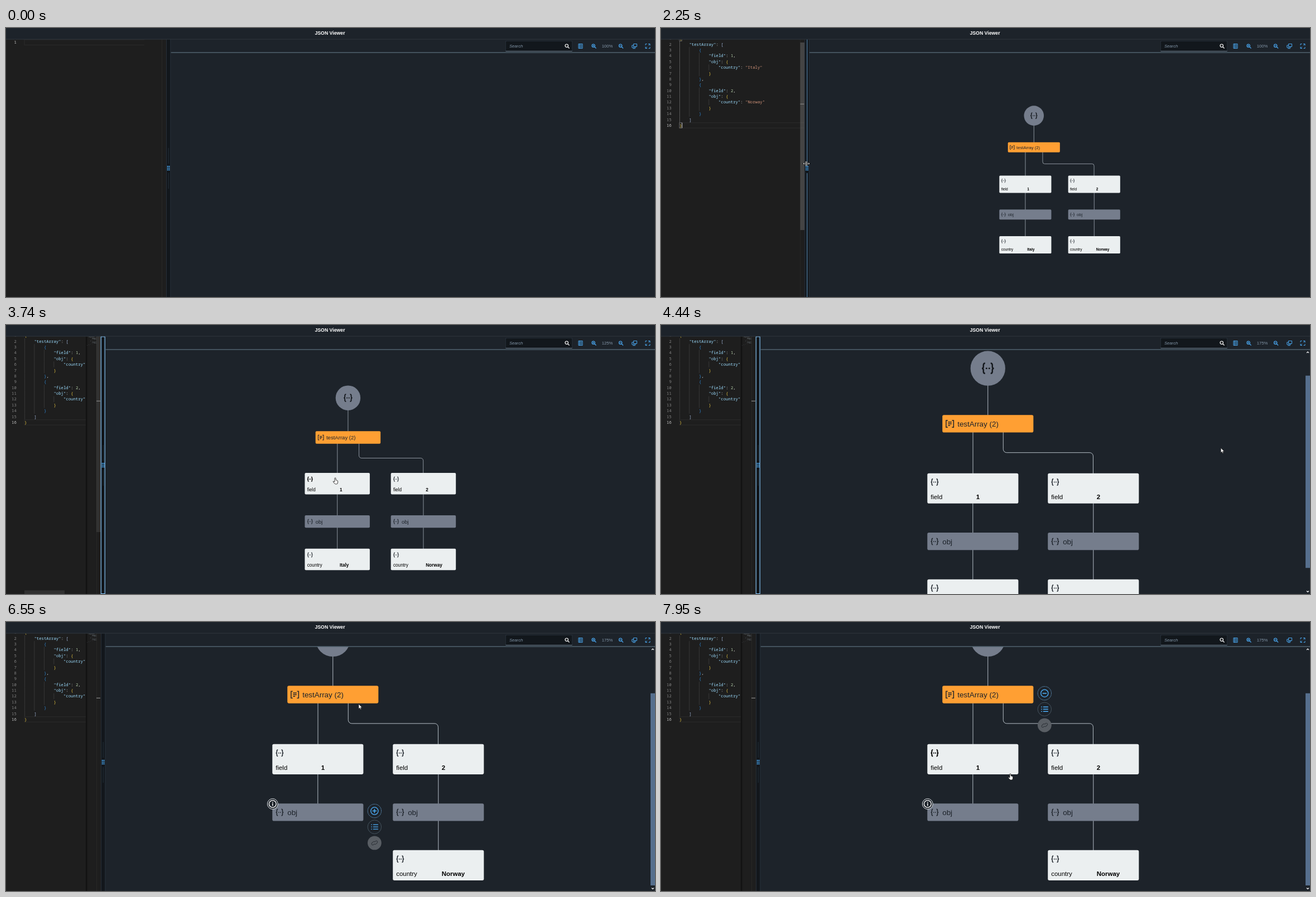
Animation, 1163 px wide and 482 px high, one loop 8000 ms. Source, as an HTML page with a canvas:

```html
<!DOCTYPE html>
<html lang="en">
<head>
<meta charset="utf-8">
<title>JSON Viewer</title>
<style>
html, body { margin: 0; width: 100%; height: 100%; overflow: hidden; background: #1d232a; }
canvas { display: block; }
</style>
</head>
<body>
<canvas id="stage" width="1163" height="482"></canvas>
<script>
const g = document.getElementById('stage').getContext('2d');
const SANS = '"Liberation Sans", Arial, sans-serif';
const MONO = '"Noto Sans Mono", "DejaVu Sans Mono", monospace';
const BG = '#1d232a', BLUE = '#4db1ff', MUTED = '#8396a8', GREY = '#757d8c';
const LOOP = 8000, TICK = 78, LINE = 10.39, CHAR = 4.375;

const CODE = JSON.stringify({ testArray: [
  { field: 1, obj: { country: 'Italy' } },
  { field: 2, obj: { country: 'Norway' } }
] }, null, 4).split('\n');

// time, x, y of the pointer
const POINTER = [
  [78, 346, 478], [390, 46, 463], [780, 46, 463], [1170, 211, 268], [1640, 211, 268],
  [2028, 290, 243], [2106, 290, 243], [2418, 231, 243], [2574, 184, 243], [2730, 173, 243],
  [2886, 173, 243], [3588, 590, 274], [4000, 590, 274], [4680, 1159, 200], [4758, 1159, 200],
  [4914, 1159, 238], [5000, 1159, 238], [5382, 576, 337], [5616, 576, 337], [6006, 660, 338],
  [6240, 660, 338], [6552, 632, 147], [6630, 628, 138], [6786, 628, 138], [7098, 687, 127],
  [7566, 687, 127], [7956, 626, 272]
];
const SPLIT = [[2106, 287], [2418, 228], [2574, 183.6], [2730, 170]];
const SCROLL = [[4758, 0.5], [4914, 1]];

const ICON = {
  object: 'M2.5-3.3Q1.4-3.3 1.4-2V-1Q1.4 0 .4 0Q1.4 0 1.4 1V2Q1.4 3.3 2.5 3.3M6.1-3.3Q7.2-3.3 7.2-2V-1Q7.2 0 8.2 0Q7.2 0 7.2 1V2Q7.2 3.3 6.1 3.3M2.9 0h1M4.7 0h1',
  array: 'M2.3-3.5H.6V3.5H2.3M6.6-3.5H8.3V3.5H6.6M2.6-1.7h3.7M2.6 0h3.7M2.6 1.7h2.2',
  lens: 'M1.9-.8A2.7 2.7 0 1 1-3.5-.8A2.7 2.7 0 1 1 1.9-.8M1.2 1.2L4 4',
  legend: 'M-3.5-4h7v8h-7zM-1.2-4v8M-2.8-2h1M-2.8 0h1M-2.8 2h1M0-2h2.5M0 0h2.5M0 2h2.5',
  overview: 'M-1.5-4h6v4.8h-6zM-1.5-1.5h-2.7v4h6.4V.8M-2.8 4.2h4.6',
  full: 'M1-4h3v3M4-4L1.2-1.2M-1 4h-3v-3M-4 4L-1.2 1.2M-4-1.5V-4h2.5M4 1.5V4H1.5',
  list: 'M-2.5-4h9M-2.5 0h9M-2.5 4h9M-6-4h1.6M-6 0h1.6M-6 4h1.6',
  link: 'M-1 2.2L-2.4 3.6A2.2 2.2 0 0 1-5.2.8L-2.4-2A2.2 2.2 0 0 1 .8-1.6M1-2.2L2.4-3.6A2.2 2.2 0 0 1 5.2-.8L2.4 2A2.2 2.2 0 0 1-.8 1.6',
  hand: 'M-1 .8Q-1-.2 0-.2T1 .8V3.8Q4.6 4 4.6 6V8Q4.6 11 2.2 11H.4Q-1 11-4 6.6Q-3.6 5.4-1 7Z',
  arrow: 'M0 0V8.6L2 6.8L3.3 9.7L4.6 9.1L3.4 6.3H6Z',
  beam: 'M-2.2-4Q0-4 0-3Q0-4 2.2-4M0-3V3M-2.2 4Q0 4 0 3Q0 4 2.2 4',
  resize: 'M-1-4v8M1-4v8M-2 0h-3.5M-4-1.6L-5.6 0L-4 1.6M2 0h3.5M4-1.6L5.6 0L4 1.6'
};

function at(keys, t) {
  const i = keys.findIndex(k => k[0] > t);
  if (i < 0) return keys[keys.length - 1].slice(1);
  if (i === 0) return keys[0].slice(1);
  const a = keys[i - 1], b = keys[i], u = (t - a[0]) / (b[0] - a[0]);
  const e = u * u * (3 - 2 * u);
  return a.slice(1).map((v, j) => v + (b[j + 1] - v) * e);
}

function rect(x, y, w, h, color, r = 0) {
  g.fillStyle = color;
  g.beginPath();
  g.roundRect(x, y, w, h, r);
  g.fill();
}

function text(s, x, cy, size, color, { style = '', font = SANS, align = 'left' } = {}) {
  g.font = `${style} ${size}px ${font}`;
  g.textAlign = align;
  g.fillStyle = color;
  g.fillText(s, x, cy + size * 0.355);
}

function icon(d, x, y, color, { s = 1, w = 0.9, fill } = {}) {
  const p = new Path2D(d);
  g.save();
  g.translate(x, y);
  g.scale(s, s);
  if (fill) { g.fillStyle = fill; g.fill(p); }
  g.strokeStyle = color;
  g.lineWidth = w;
  g.stroke(p);
  g.restore();
}

function disc(x, y, r, fill, stroke, w = 1, dash = []) {
  g.beginPath();
  g.arc(x, y, r, 0, 7);
  if (fill) { g.fillStyle = fill; g.fill(); }
  if (!stroke) return;
  g.setLineDash(dash);
  g.strokeStyle = stroke;
  g.lineWidth = w;
  g.stroke();
  g.setLineDash([]);
}

function clip(x, y, w, h, draw) {
  g.save();
  g.beginPath();
  g.rect(x, y, w, h);
  g.clip();
  draw();
  g.restore();
}

function codeLines(y0, focused) {
  const colors = ['#e0c040', '#a0b4d8', '#2f86d2'];
  let depth = 0;
  CODE.forEach((line, i) => {
    const cy = y0 + (i + 0.5) * LINE;
    const indent = line.search(/\S/);
    for (let c = 0; c < indent; c += 4)
      rect(33 + c * CHAR, cy - LINE / 2, 0.7, LINE, c || !focused ? '#404040' : '#707070');
    for (const m of line.matchAll(/"[^"]*"(?=:)|"[^"]*"|\d+|[{}[\]]|[:,]/g)) {
      const s = m[0];
      let color = '#d4d4d4';
      if (/[{[]/.test(s)) color = colors[depth++ % 3];
      else if (/[}\]]/.test(s)) color = colors[--depth % 3];
      else if (/\d/.test(s)) color = '#b5cea8';
      else if (s[0] === '"') color = line[m.index + s.length] === ':' ? '#9cdcfe' : '#ce9178';
      text(s, 33 + m.index * CHAR, cy, 7.29, color, { font: MONO });
    }
  });
}

function editor(t, W) {
  const pasted = t >= 858, dragging = t > 2106 && t < 2730;
  const focused = pasted && t < 2730;
  const map = 249 - (287 - W) * 0.897;
  const y0 = pasted ? 13.4 : 20.5;
  const rows = pasted ? CODE.length : 1, active = y0 + (rows - 1) * LINE;
  clip(0, 20.5, W, 462, () => {
    rect(0, 20, W, 462, '#1e1e1e');
    for (let i = 0; i < rows; i++)
      text(i + 1, 18.8, y0 + (i + 0.5) * LINE, 7.29, i === rows - 1 ? '#c6c6c6' : '#858585', { font: MONO, align: 'right' });
    clip(32, 20, (dragging ? W : map) - 33, 462, () => {
      g.strokeStyle = '#2b2b2b';
      g.lineWidth = 1;
      g.strokeRect(33, active + 0.5, 400, LINE - 1);
      if (focused) {
        g.strokeStyle = '#888';
        g.lineWidth = 0.6;
        for (const y of [y0, active]) g.strokeRect(33, y + 0.5, CHAR, LINE - 1);
        rect(37.2, active + 0.5, 1, LINE - 1, '#c8c8c8');
      }
      if (pasted) codeLines(y0, focused);
    });
    if (W < 250) {
      const shade = g.createLinearGradient(map - 1, 0, map + 3, 0);
      shade.addColorStop(0, '#0008');
      shade.addColorStop(1, '#0000');
      rect(map - 1, 20, 4, 462, shade);
    }
    if (pasted && !dragging) clip(map, 20, W - 8 - map, 40, () => {
      CODE.forEach((line, i) => {
        const n = line.search(/\S/);
        rect(map + 1 + n * 0.75, 20 + i * 1.09, (line.length - n) * 0.75, 0.7, '#77808888');
      });
    });
    rect(W - 8, 20, 0.8, 462, '#38383480');
    const alpha = !pasted || t >= 3822 ? 0 : t < 2886 ? 0.42 : 0.22;
    if (pasted) rect(W - 8, 135.7, 7, 1, '#a0a0a0');
    if (alpha) {
      const bar = `rgba(121,121,121,${alpha})`;
      rect(W - 8, dragging ? 26 : 20, 8, dragging ? 336 : 351, bar);
      if (W < 250) rect(33, 475.5, W < 183 ? 72 : 80, 7, bar);
    }
    if (focused && !dragging) {
      rect(W - 7.5, 20, 3.5, 7, '#a0a0a0');
      rect(W - 7.5, 136, 3.5, 8, '#a0a0a0');
    }
  });
}

function splitter(t, W) {
  rect(W, 20.5, 8, 462, '#12171c');
  rect(W, 20.5, 0.8, 462, '#2c3640');
  rect(W + 7.4, 20.5, 0.8, 462, '#2c3640');
  const dragging = t > 2106 && t < 2730;
  if (dragging) {
    rect(W + 3.9, 20.5, 0.9, 225, '#6ca6d6');
    rect(W + 3.9, 260, 0.9, 222, '#6ca6d6');
  } else {
    rect(W + 3.8, 215, 0.6, 28, '#33414f');
    rect(W + 3.8, 260, 0.6, 28, '#33414f');
  }
  for (let i = 0; i < 6; i++)
    rect(W + 1.8 + (i % 2) * 2.8, 247 + (i >> 1) * 3.1, 1.8, 2, BLUE);
  if (t >= 2730 && t < 4758) {
    g.strokeStyle = '#8accff';
    g.lineWidth = 1.1;
    g.strokeRect(W + 0.3, 21, 6.9, 460.5);
  }
}

function toolbar(zoom, left) {
  rect(left, 43.5, 1163 - left, 1, '#6a8290');
  rect(895, 23, 120, 19, '#2f3b47', 2);
  rect(895.6, 23.6, 118.8, 17.8, '#12171c', 1.5);
  rect(895.5, 41.2, 119, 0.9, MUTED);
  text('Search', 902, 32.5, 7.66, MUTED, { style: 'italic' });
  icon(ICON.lens, 1005.5, 32.5, '#fff', { w: 1.2 });
  const lens = ICON.lens + 'M-2.1-.8h2.6';
  icon(ICON.legend, 1029.5, 32.5, BLUE);
  icon(lens + 'M-.8-2.1v2.6', 1053.5, 32.5, BLUE, { w: 1.1 });
  text(zoom * 100 + '%', 1077.5, 32.5, 7.66, MUTED, { align: 'center' });
  icon(lens, 1102, 32.5, BLUE, { w: 1.1 });
  icon(ICON.overview, 1126, 32.5, BLUE);
  icon(ICON.full, 1150, 32.5, BLUE);
}

function badge(x, y) {
  disc(x, y, 9.4, BG, '#e4e8ec', 1);
  disc(x, y, 6.4, null, '#fff', 1.4);
  rect(x - 0.7, y - 1.2, 1.4, 4.6, '#fff');
  rect(x - 0.7, y - 3.6, 1.4, 1.5, '#fff');
}

function menu(x, y, collapsed) {
  disc(x, y, 12.2, BG, '#7cc0f8', 1, [1.2, 1.2]);
  disc(x, y, 6.6, null, BLUE, 1.3);
  rect(x - 3.6, y - 0.7, 7.2, 1.4, BLUE);
  if (collapsed) rect(x - 0.7, y - 3.6, 1.4, 7.2, BLUE);
  disc(x, y + 28.6, 12.2, BG, '#46545f', 1);
  icon(ICON.list, x, y + 28.6, BLUE, { w: 1.4 });
  disc(x, y + 57.3, 12.4, '#595e64');
  icon(ICON.link, x, y + 57.3, '#34393f', { w: 1.2 });
}

function graph(t, zoom, left, mouse) {
  const content = 303.8 * zoom, scrolls = content > 438;
  const right = scrolls ? 1155 : 1163, f = at(SCROLL, t)[0];
  const ox = (left + right) / 2;
  const oy = 44 + 28 * zoom + (438 - content) * (scrolls ? f : 0.5);
  const inside = b => mouse.x > b.x && mouse.x < b.x + b.w && mouse.y > b.y && mouse.y < b.y + b.h;
  const box = (x, y, h) => ({ x: ox + x * zoom, y: oy + y * zoom, w: 93.2 * zoom, h: h * zoom });
  let hot = false;

  function edge(...pts) {
    const p = pts.map(([x, y]) => [ox + x * zoom, oy + y * zoom]);
    g.strokeStyle = '#bcc5ce';
    g.lineWidth = Math.max(0.7, 0.55 * zoom);
    g.beginPath();
    g.moveTo(...p[0]);
    for (let i = 1; i < p.length - 1; i++) g.arcTo(...p[i], ...p[i + 1], 3.6 * zoom);
    g.lineTo(...p[p.length - 1]);
    g.stroke();
  }
  function node(b, color, glyph, label, value) {
    const over = inside(b), ink = over ? '#000' : BG;
    const px = v => b.x + v * zoom, py = v => b.y + v * zoom;
    hot = hot || over;
    rect(b.x, b.y, b.w, b.h, color, 1.6 * zoom);
    icon(glyph, px(3.2), py(9.1), ink, { s: zoom, w: over ? 1.05 : 0.85 });
    if (value === undefined) return text(label, px(15.4), py(9), 7.66 * zoom, ink);
    text(label, px(3.4), py(23.9), 6.56 * zoom, '#000');
    text(value, px(50), py(23.9), 6.56 * zoom, '#000', { style: 'bold' });
  }

  const arrayBox = box(-92.9, 65.7, 17.9), objBox = box(-108.3, 186.2, 17.9);
  const objFolded = t >= 6162, arrayFolded = t >= 7254 && t < 7488;
  clip(left, 44.5, right - left, 438, () => {
    edge([-46.3, 35], [-46.3, 66]);
    disc(ox - 46.3 * zoom, oy + 18 * zoom, 17.8 * zoom, GREY);
    icon(ICON.object, ox - 53.1 * zoom, oy + 18 * zoom, '#14181d', { s: 1.58 * zoom });
    if (!arrayFolded) {
      edge([-61.6, 83], [-61.6, 126]);
      edge([-30.6, 83], [-30.6, 104.3], [61.5, 104.3], [61.5, 126]);
      [['Italy', -108.3, objFolded], ['Norway', 15.1, false]].forEach(([name, x, folded], i) => {
        const mid = x + 46.6;
        edge([mid, 156], [mid, 187]);
        node(box(x, 125.4, 30.9), '#ebeff0', ICON.object, 'field', i + 1);
        if (!folded) {
          edge([mid, 203], [mid, 235]);
          node(box(x, 234, 30.9), '#ebeff0', ICON.object, 'country', name);
        }
        node(box(x, 186.2, 17.9), GREY, ICON.object, 'obj');
      });
      if (objFolded) badge(objBox.x + 0.5, objBox.y + 0.8);
    }
    node(arrayBox, '#ff9f33', ICON.array, 'testArray (2)');
    if (arrayFolded) badge(arrayBox.x + 0.5, arrayBox.y + 0.8);
    const picked = t >= 6708 ? arrayBox : t >= 5694 ? objBox : null;
    if (picked) {
      const mx = picked.x + picked.w + 20, my = picked.y + picked.h / 2 - 2.3;
      menu(mx, my, picked === arrayBox ? arrayFolded : objFolded);
      hot = hot || Math.hypot(mouse.x - mx, mouse.y - my) < 12;
    }
  });

  if (scrolls) {
    const size = 418 * 438 / content;
    rect(1155, 54 + (418 - size) * f, 8, size, '#566f8e');
    icon('M-2 1L0-1L2 1', 1159, 49, '#fff', { w: 1.1 });
    icon('M-2-1L0 1L2-1', 1159, 477.5, '#fff', { w: 1.1 });
  }
  return hot;
}

function pointer(t, W, { x, y }, hot) {
  if (t < 78) return;
  if (hot) icon(ICON.hand, x, y, '#111', { w: 0.8, fill: '#fff' });
  else if (x < W - 8) icon(ICON.beam, x, y, '#ddd', { w: 0.8 });
  else if (x >= W && x <= W + 8) {
    icon(ICON.resize, x, y, '#000', { w: 2 });
    icon(ICON.resize, x, y, '#fff');
  } else icon(ICON.arrow, x, y, '#111', { w: 0.6, fill: '#fff' });
}

function draw(now) {
  const t = Math.floor((now % LOOP + 12) / TICK) * TICK;
  const W = at(SPLIT, t)[0], left = W + 8.6;
  const [x, y] = at(POINTER, t), mouse = { x, y };
  const zoom = t < 3588 ? 1 : t < 3822 ? 1.25 : t < 3978 ? 1.5 : 1.75;
  rect(0, 0, 1163, 482, BG);
  editor(t, W);
  const hot = t >= 1014 && graph(t, zoom, left, mouse);
  toolbar(zoom, left);
  splitter(t, W);
  rect(0, 19.7, 1163, 0.9, '#363c43');
  text('JSON Viewer', 580.5, 8.8, 8.72, '#fff', { style: 'bold', align: 'center' });
  pointer(t, W, mouse, hot);
}

const start = performance.now();
(function frame() {
  draw(performance.now() - start);
  requestAnimationFrame(frame);
})();
</script>
</body>
</html>
```
